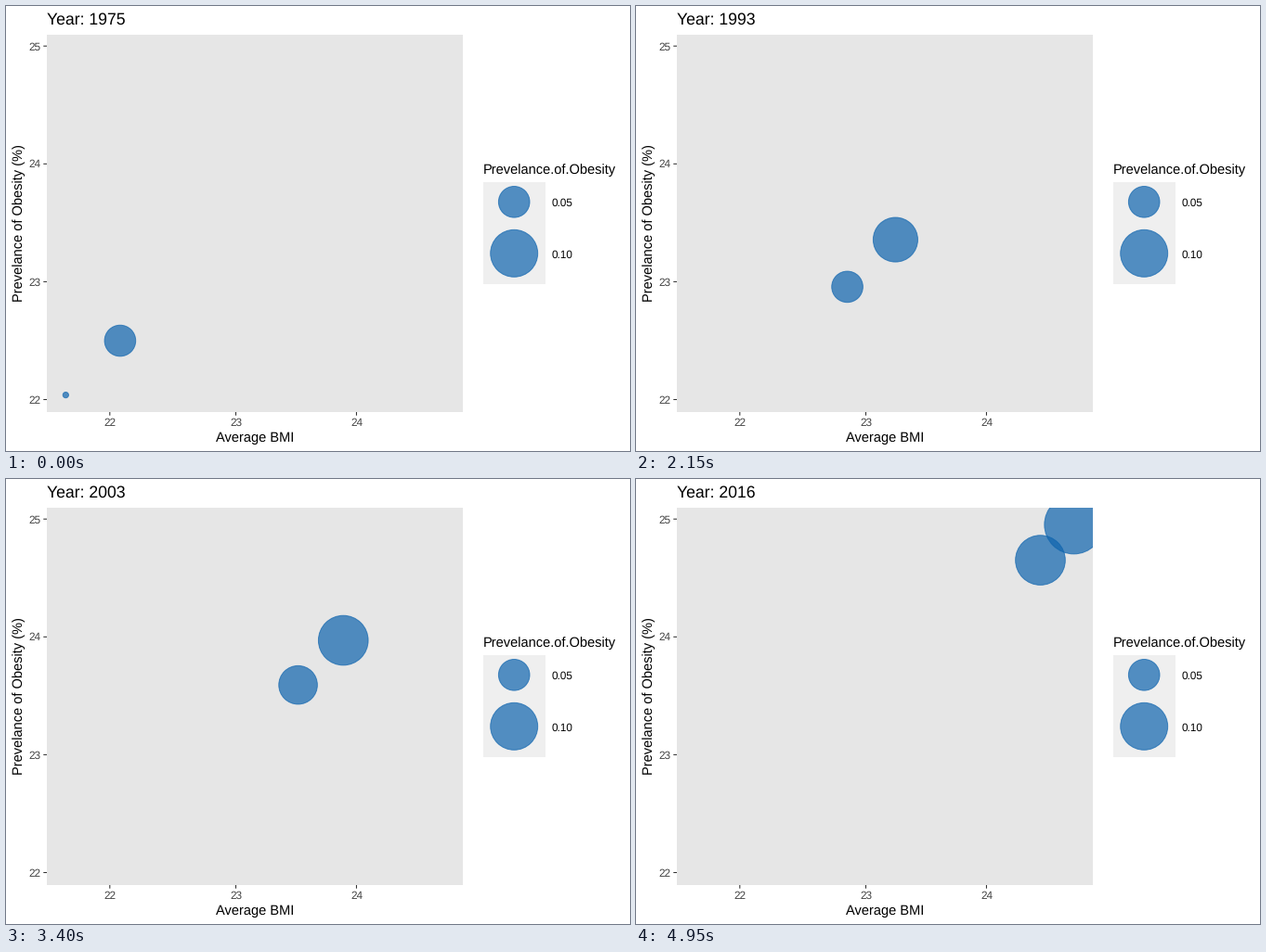
A matplotlib script for the animation above (5 s loop, 672 px wide and 480 px high).

```python
import numpy as np
import matplotlib.pyplot as plt
from matplotlib.animation import FuncAnimation
from matplotlib.patches import Circle, Rectangle

W, H, DPI = 672, 480, 96
FRAMES, INTERVAL = 100, 50
FIRST, LAST = 1975, 2016
BLUE = (14 / 255, 100 / 255, 174 / 255, 0.7)
PANEL, KEY, TICK, TICK_TEXT = "#E6E6E6", "#EFEFEF", "#333333", "#444444"
STROKE = 0.95  # outline width in pixels

plt.rcParams["font.family"] = "Liberation Sans"
plt.rcParams["text.hinting"] = "none"

fig = plt.figure(figsize=(W / DPI, H / DPI), dpi=DPI, facecolor="white")
ax = fig.add_axes([0, 0, 1, 1])
ax.set_xlim(0, W)
ax.set_ylim(H, 0)
ax.axis("off")


def rect(x0, y0, x1, y1, color):
    return ax.add_patch(Rectangle((x0, y0), x1 - x0, y1 - y0, fc=color, lw=0))


def label(x, y, text, size=11, color="black", ha="left", **kw):
    return ax.text(x, y, text, fontsize=size, color=color, ha=ha,
                   va="baseline", **kw)


def tick(xs, ys):
    ax.plot(xs, ys, color=TICK, lw=1.07 * 72 / DPI, solid_capstyle="butt",
            snap=False)


def radius(share):
    """Bubble area grows with the share of obesity above its minimum."""
    return 3.6 + 79 * np.sqrt(share - 0.02)


def bubble(x, y, share):
    return ax.add_patch(Circle((x, y), radius(share) - STROKE / 2, fc=BLUE,
                               ec=BLUE, lw=STROKE * 72 / DPI))


# Each year's data lands on a whole frame; the motion between is linear.
years = np.arange(FIRST, LAST + 1)
progress = (years - FIRST) / (LAST - FIRST)
year_frames = np.round(progress * (FRAMES - 1))
KEY_YEARS = np.array([0, 7.5, 14.5, 21.5, 32, 41]) / (LAST - FIRST)


class Series:
    """A bubble on a smooth path, sized by a rising, rounded share."""

    def __init__(self, xs, ys, trend):
        self.tracks = [np.polyval(np.polyfit(KEY_YEARS, v, 4), progress)
                       for v in (xs, ys)]
        shares = np.round(np.polyval(trend, progress), 2)
        self.tracks.append(radius(shares) - STROKE / 2)
        self.dot = bubble(0, 0, 0.05)
        self.dot.set_clip_path(panel)

    def update(self, t):
        x, y, r = (np.interp(t, year_frames, track) for track in self.tracks)
        self.dot.center = x, y
        self.dot.set_radius(r)


# Panel and axes
panel = rect(44, 31, 492, 438, PANEL)
for value in range(22, 26):
    y = 424.5 - 127.1 * (value - 22)
    tick([40.3, 44], [y, y])
    label(37.5, y + 4.2, str(value), 8.8, TICK_TEXT, "right")
for value in range(22, 25):
    x = 111.8 + 3053 * np.log(value / 22)
    tick([x, x], [438, 441.7])
    label(x, 453, str(value), 8.8, TICK_TEXT, "center")
label(267.8, 470, "Average BMI", ha="center")
label(18, 234.5, "Prevelance of Obesity (%)", ha="center",
      rotation=90, rotation_mode="anchor")
title = label(44, 20, "", 13.2)

# Legend
label(513.8, 181, "Prevelance.of.Obesity")
rect(514, 190, 581, 300, KEY)
for share, y in ((0.05, 211.3), (0.10, 266.8)):
    bubble(547.2, y, share)
    label(588, y + 4.8, f"{share:.2f}", 8.8)

lower = Series([64.5, 135, 199, 256.5, 351, 435.4],
               [419.5, 377.5, 328, 276.5, 185.6, 87.6],
               [0.043, 0.040, 0.0245])
upper = Series([123, 189.5, 251, 308, 397, 471.4],
               [361, 323.5, 277, 226, 139.6, 49.3],
               [0.0245, 0.068, 0.054])


def update(t):
    year = FIRST + (LAST - FIRST) * t / (FRAMES - 1)
    title.set_text(f"Year: {round(year)}")
    lower.update(t)
    upper.update(t)
    return title, lower.dot, upper.dot


anim = FuncAnimation(fig, update, frames=FRAMES, interval=INTERVAL,
                     repeat=True, repeat_delay=0)
plt.show()
```
